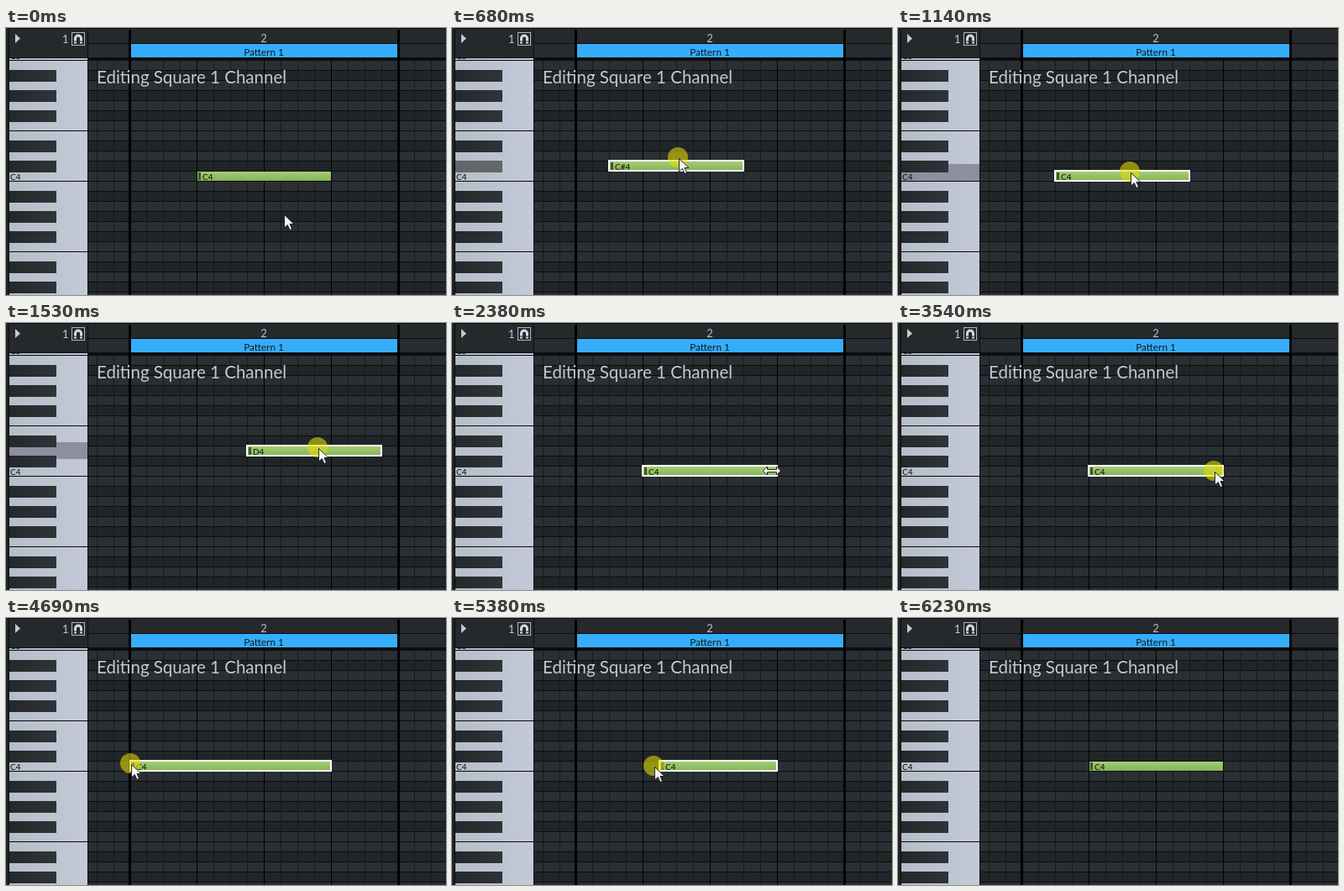
An HTML page for the animation above (6.46 s loop, 524 px wide and 318 px high).

```html
<!DOCTYPE html>
<html lang="en">
<head>
<meta charset="utf-8">
<title>Piano roll</title>
<style>
  html, body { margin: 0; width: 100%; height: 100%; overflow: hidden; background: #1f2326; }
  svg { display: block; width: 524px; height: 318px; }
  text { font-family: Lato, "Open Sans", sans-serif; }
  .small { font-size: 10px; fill: #0c0f0c; }
</style>
</head>
<body>
<svg viewBox="0 0 524 318" xmlns="http://www.w3.org/2000/svg">
  <defs>
    <linearGradient id="white"><stop offset="0" stop-color="#b4bec8"/><stop offset="1" stop-color="#c4c9d8"/></linearGradient>
    <linearGradient id="black"><stop offset="0" stop-color="#24282b"/><stop offset="1" stop-color="#2f3438"/></linearGradient>
    <linearGradient id="green" x2="0" y2="1"><stop offset="0" stop-color="#a5cd74"/><stop offset="1" stop-color="#85b457"/></linearGradient>
    <clipPath id="roll"><rect y="36" width="524" height="282"/></clipPath>
  </defs>

  <g clip-path="url(#roll)">
    <g id="grid"></g>
    <rect x="4" y="36" width="93" height="282" fill="url(#white)"/>
    <rect id="whiteHit" x="4" width="93" fill="#8d8f9f"/>
    <g id="keys"></g>
    <rect id="blackHit" x="4" width="56" fill="#626769"/>
  </g>

  <g id="header">
    <rect width="524" height="36" fill="#25292c"/>
    <rect x="98" y="19" width="426" height="17" fill="#282c30"/>
    <path d="M0 .5H524M98 18.5H524M0 35.5H524" stroke="#0c0e10"/>
    <path d="M98 37H524" stroke="#0c0e10" stroke-width="2"/>
    <path d="M97.5 0V318" stroke="#0c0e10"/>
    <path d="M147.5 2V318M467.5 2V318" stroke="#000" stroke-width="3"/>
    <rect x="149" y="19" width="317" height="16" fill="#36adfa"/>
    <path d="M11 7L17 12.5L11 18Z" fill="#c3ccd4"/>
    <text x="67" y="18" font-size="13" fill="#c3ccd4">1</text>
    <rect x="78.5" y="5.5" width="15" height="15" fill="none" stroke="#aeb6bd"/>
    <path d="M82.5 18.5V12.5a3.5 3.5 0 0 1 7 0V18.5" fill="none" stroke="#d3dae0" stroke-width="3"/>
    <path d="M80.5 16H91.5" stroke="#25292c"/>
    <text x="307" y="17" font-size="13" fill="#b9c2ca" text-anchor="middle">2</text>
    <text x="307" y="33" font-size="11.8" fill="#0b1a26" text-anchor="middle">Pattern 1</text>
  </g>
  <rect width="3" height="318" fill="#1f2326"/>
  <path d="M3.5 0V318" stroke="#0c0e10"/>

  <g id="note">
    <rect id="body" height="11" fill="url(#green)"/>
    <rect id="grip" width="3" height="9" fill="#46582f"/>
    <text id="label" class="small"></text>
    <rect id="frame" height="12" fill="none" stroke="#fff" stroke-width="2"/>
  </g>
  <text x="108" y="66" font-size="20.5" fill="#bfcad4">Editing Square 1 Channel</text>

  <circle id="press" r="12" fill="#e6dc00" fill-opacity=".58"/>
  <path id="arrow" d="M.5 .5V16L4.3 12.5L7 18.500L9.500 17.300L7 11.500H12Z" fill="#f4f6fb" stroke="#15171c" stroke-width=".9"/>
  <path id="resize" d="M-10.500 0L-5.500 -5V-1.500H5.500V-5L10.500 0L5.500 5V1.500H-5.500V5Z" fill="#fff" stroke="#111" stroke-width=".9"/>
</svg>

<script>
const LOOP = 6460, TICK = 1000 / 13, LAST = 83;
const ROW = 12, STEP = 19.94, BAR = 148, C4_TOP = 170, BLACK_H = 14;
const NAMES = ["C", "C#", "D", "D#", "E", "F", "F#", "G", "G#", "A", "A#", "B"];
const GRAB = { x: 309, y: 170 };

// pointer glides: it rests between them
const GLIDES = [
  { from: 0, to: 3, x: 310, y: 170 },
  { from: 24, to: 26, x: 366, y: 167 },
  { from: 26, to: 31, x: 381, y: 176 },
  { from: 33, to: 38, x: 475, y: 179 },
  { from: 38, to: 40, x: 403, y: 178 },
  { from: 41, to: 46, x: 377, y: 177 },
  { from: 47, to: 51, x: 230, y: 176 },
  { from: 58, to: 61, x: 149, y: 174 },
  { from: 62, to: 67, x: 276, y: 179 },
  { from: 67, to: 71, x: 229, y: 176 },
  { from: 73, to: 81, x: 488, y: 330 }
];

const $ = id => document.getElementById(id);
const set = (id, attrs) => { for (const k in attrs) $(id).setAttribute(k, attrs[k]); };
const show = (id, on) => set(id, { visibility: on ? "visible" : "hidden" });
const place = (id, x, y) => set(id, { transform: `translate(${Math.round(x)} ${Math.round(y)})` });
const rect = (x, y, w, h, fill) => `<rect x="${x}" y="${y}" width="${w}" height="${h}" fill="${fill}"/>`;
const pitchClass = p => p % 12;
const isWhite = p => NAMES[pitchClass(p)].length === 1;
const noteName = p => NAMES[pitchClass(p)] + (Math.floor(p / 12) - 1);
const rowTop = p => C4_TOP - (p - 60) * ROW;
const stepX = s => Math.floor(BAR + s * STEP);

function buildRoll() {
  let grid = "", keys = "";
  for (let p = 47; p <= 72; p++) {
    const y = rowTop(p), pc = pitchClass(p);
    grid += rect(98, y, 426, ROW, isWhite(p) ? "#2a2f33" : "#202528") + rect(98, y, 426, 1, "#0b0d0f");
    if (!isWhite(p)) keys += rect(4, y, 56, BLACK_H, "url(#black)");
    if (pc === 0 || pc === 5) keys += rect(4, y + ROW, 93, 1, "#08090a");
    if (pc === 0) keys += `<text class="small" x="5" y="${y + 11}">${noteName(p)}</text>`;
  }
  for (let s = -2; s < 19; s++)
    grid += rect(stepX(s), 38, 1, 280, s % 4 ? "#171a1d" : "#000");
  $("grid").innerHTML = grid;
  $("keys").innerHTML = keys;
}

function orbit(turn, cx, cy, rx, ry) {
  const a = 2 * Math.PI * turn;
  return { x: cx - rx * Math.cos(a), y: cy - ry * Math.sin(a) };
}

function pointer(n) {
  if (n >= 9 && n < 18) return orbit((n - 9.1) / 6.5, 312, 151, 42, 39);
  if (n >= 18 && n < 24) return orbit((n - 17.5) / 6.5, 345, 164, 36, 22);
  let x = 331, y = 222;
  for (const g of GLIDES) {
    const u = Math.min(1, Math.max(0, (n - g.from) / (g.to - g.from)));
    x += (g.x - x) * u;
    y += (g.y - y) * u;
  }
  return { x, y };
}

function lightKey(p) {
  show("whiteHit", p !== null && isWhite(p));
  show("blackHit", p !== null && !isWhite(p));
  if (p === null) return;
  if (!isWhite(p)) return set("blackHit", { y: rowTop(p), height: BLACK_H });
  // C to E share 60px, F to B share 84px
  const pc = pitchClass(p), upper = pc >= 5;
  const height = upper ? 21 : 20;
  const index = upper ? Math.ceil((pc - 5) / 2) : pc / 2;
  const base = rowTop(p - pc) + ROW - (upper ? 60 : 0);
  set("whiteHit", { y: base - (index + 1) * height, height });
}

function draw(n) {
  const { x, y } = pointer(n);
  const moving = n >= 5 && n < 24;
  const right = n >= 34 && n < 48;
  const left = n >= 53 && n < 74;
  const pressed = moving || right || left;
  const selected = n >= 3 && n < 78;

  let start = 4, end = 12, pitch = 60;
  const snapped = Math.round((x + 1 - BAR) / STEP);
  if (moving) {
    const shift = Math.floor((x - GRAB.x) / 20);
    start += shift;
    end += shift;
    pitch -= Math.round((y - GRAB.y) / ROW);
  }
  if (right) end = snapped;
  if (left && n < 73) start = snapped;

  const x1 = stepX(start), x2 = stepX(end), top = rowTop(pitch);
  set("body", { x: x1 + 1, y: top + 1, width: x2 - x1 - 1 });
  set("grip", { x: x1 + 2, y: top + 2 });
  set("label", { x: x1 + 7, y: top + 11 });
  set("frame", { x: x1, y: top, width: x2 - x1 });
  $("label").textContent = noteName(pitch);
  show("frame", selected);
  lightKey(moving ? pitch : null);

  const nearEdge = Math.min(Math.abs(x - x1), Math.abs(x - x2)) < 14;
  const sizing = selected && !pressed && nearEdge && y > 168 && y < 184;
  show("press", pressed);
  show("arrow", !sizing);
  show("resize", sizing);
  place("press", x - 1, y - 1);
  place("arrow", x, y);
  place("resize", x, y);
}

function frame() {
  const t = performance.now() % LOOP;
  draw(Math.min(LAST, Math.floor((t + 14.5) / TICK)));
  requestAnimationFrame(frame);
}

buildRoll();
frame();
</script>
</body>
</html>
```
